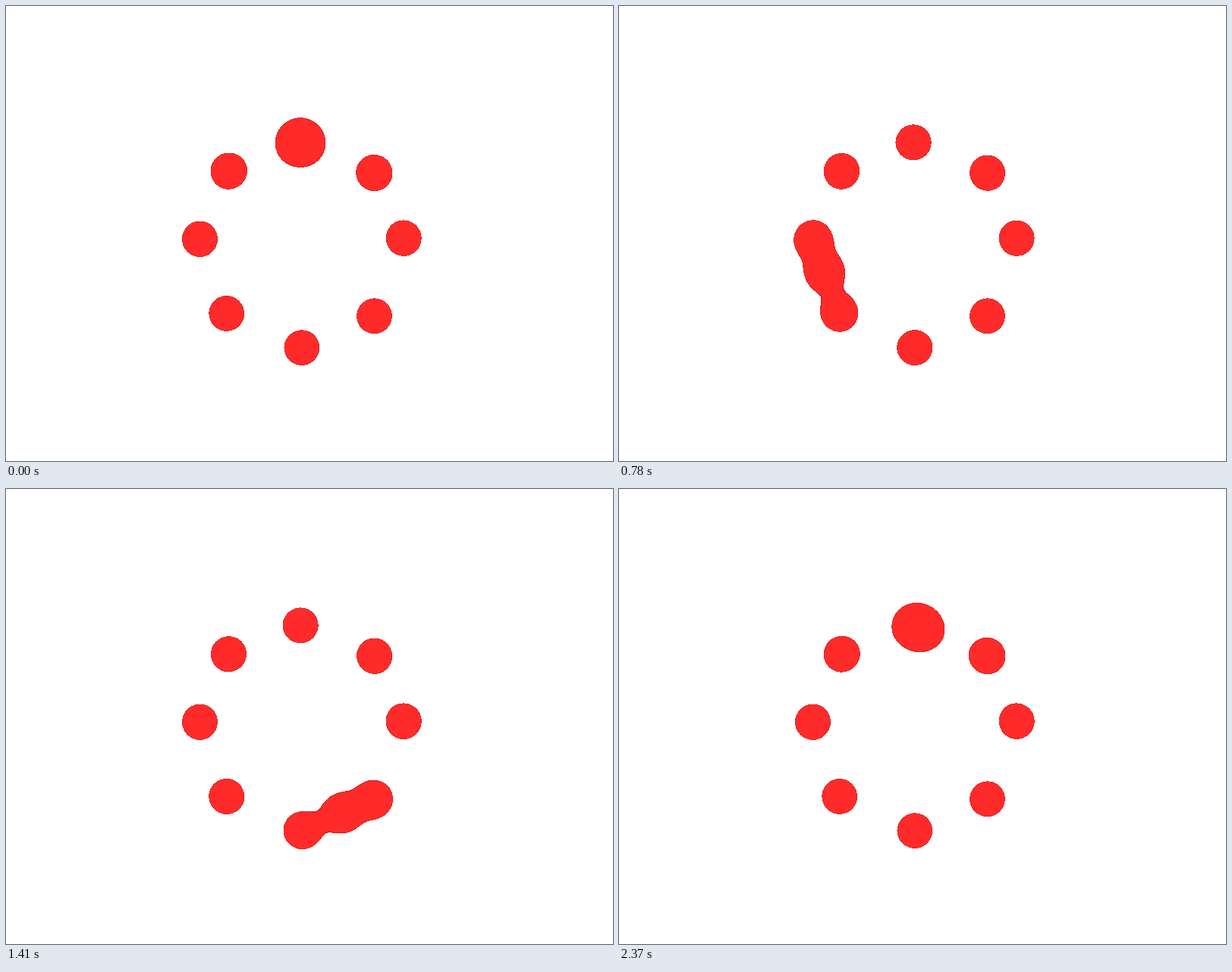
Animation, 800 px wide and 600 px high, one loop 2.4 s. Source, as an HTML page with a canvas:

```html
<!DOCTYPE html>
<html lang="en">
<head>
<meta charset="utf-8">
<title>Metaball loader</title>
<style>
  html, body { margin: 0; width: 100%; height: 100%; overflow: hidden; background: #fff; }
  canvas { display: block; }
</style>
</head>
<body>
<canvas id="stage" width="800" height="600"></canvas>
<script>
const ctx = document.getElementById('stage').getContext('2d');
const LEFT = 215, TOP = 140, WIDTH = 350, HEIGHT = 350;
const STRENGTH = 467;
const STEP = 30, STEPS = 80;

// Resting dots, counterclockwise from the top
const dots = [
  [388.1, 179.5], [293.2, 217.4], [255.1, 307.3], [290.5, 405.7],
  [389.8, 450.9], [485.7, 409], [524.5, 306.3], [485.8, 219.8]
];

const image = ctx.createImageData(WIDTH, HEIGHT);
const pixels = new Uint32Array(image.data.buffer);
const rgb = (r, g, b) => (255 << 24 | b << 16 | g << 8 | r) >>> 0;
const WHITE = rgb(255, 255, 255), RED = rgb(255, 43, 43), RIM = rgb(218, 37, 37);

const influence = (x, y, [cx, cy]) =>
  STRENGTH / ((x - cx) ** 2 + (y - cy) ** 2 + 1e-6);

const pixelX = i => LEFT + i % WIDTH + 0.5;
const pixelY = i => TOP + Math.floor(i / WIDTH) + 0.5;

const restField = Float32Array.from(pixels, (_, i) =>
  dots.reduce((sum, dot) => sum + influence(pixelX(i), pixelY(i), dot), 0));

// The ball travels in straight lines and rests one step on each dot
function ballAt(step) {
  let leg = 0, t = step / 11;
  if (step >= 12) {
    leg = Math.floor((step - 2) / 10);
    t = (step - 2) % 10 / (leg === 7 ? 8 : 9);
  }
  const a = dots[leg], b = dots[(leg + 1) % 8];
  return [a[0] + (b[0] - a[0]) * t, a[1] + (b[1] - a[1]) * t];
}

function draw(step) {
  const ball = ballAt(step);
  for (let i = 0; i < pixels.length; i++) {
    const field = restField[i] + influence(pixelX(i), pixelY(i), ball);
    const depth = (1 - 1 / Math.sqrt(field)) * Math.sqrt(STRENGTH);
    pixels[i] = depth < 0 ? WHITE : depth < 0.6 ? RIM : RED;
  }
  ctx.putImageData(image, LEFT, TOP);
}

let shown = -1;
function tick() {
  const step = Math.floor(performance.now() / STEP) % STEPS;
  if (step !== shown) draw(shown = step);
  requestAnimationFrame(tick);
}
tick();
</script>
</body>
</html>
```
